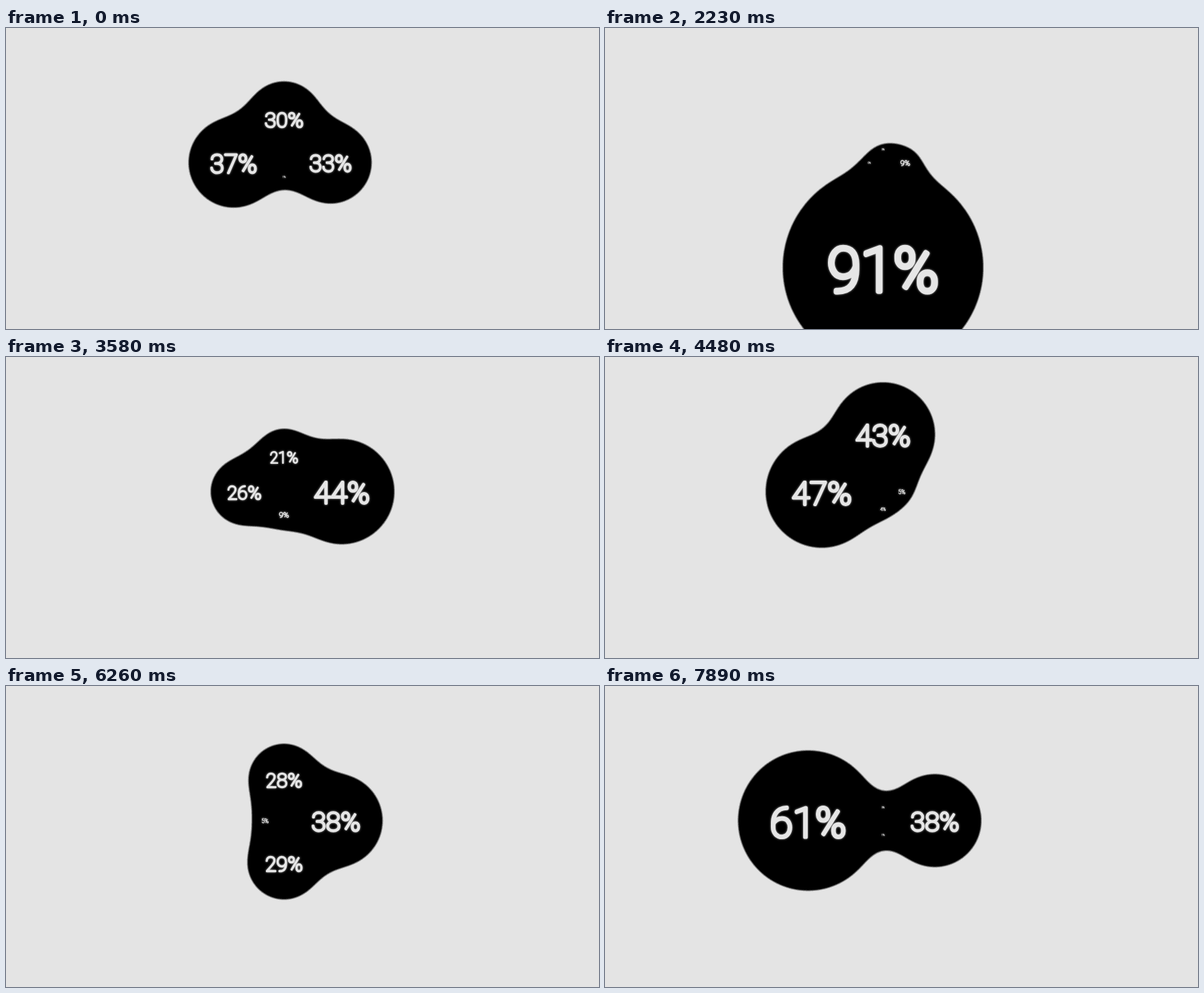
An HTML page that plays this animation: 883x448 px, repeating every 8 s.

```html
<!DOCTYPE html>
<html lang="en">
<head>
<meta charset="utf-8">
<title>Blob shares</title>
<style>
  html, body { margin: 0; width: 100%; height: 100%; overflow: hidden; background: #e4e4e4; }
  svg { display: block; width: 883px; height: 448px; }
  text {
    font-family: Roboto, sans-serif;
    font-weight: 100;
    text-anchor: middle;
    fill: #e6e6e6;
    stroke: #e6e6e6;
    stroke-width: 0.085em;
    stroke-linejoin: round;
    stroke-linecap: round;
  }
  #labels { filter: drop-shadow(0 0 1.6px rgba(228, 228, 228, 0.75)); }
</style>
</head>
<body>
<svg viewBox="0 0 883 448">
  <filter id="goo" filterUnits="userSpaceOnUse" x="-20" y="-80" width="923" height="720">
    <feGaussianBlur stdDeviation="20"/>
    <feColorMatrix values="1 0 0 0 0  0 1 0 0 0  0 0 1 0 0  0 0 0 20 -11.6"/>
  </filter>
  <g id="blobs" filter="url(#goo)"></g>
  <g id="labels"></g>
</svg>
<script>
const LOOP = 8000, STEP = 148.9, LEAD = 8;
const CX = 414, CY = 200.3;
const DIRS = [[-1, 0], [0, -1], [0, 1], [1, 0]];

// Key poses: step, then percent left, top and bottom; right takes the rest
const POSES = [
  [0, 36.7, 29.8, 0.6],
  [4, 31, 24, 2],
  [7, 23, 15, 29],
  [13, 0, 0, 97],
  [15, 0.3, 0.3, 90.7],
  [24, 26, 21, 9],
  [31, 48.3, 44.4, 3.6],
  [37, 20.7, 29.7, 28.9],
  [41, 7, 28, 27.3],
  [47, 0.6, 26, 46],
  [51, 73.5, 0.4, 0.7],
  [53, 61, 0.3, 0.6]
];

function slope(i, c) {
  const a = POSES[i], b = POSES[i + 1];
  return a && b ? (b[c] - a[c]) / (b[0] - a[0]) : 0;
}

// Monotone tangent: flat at peaks, so the curve never overshoots a pose
function tangent(i, c) {
  const p = slope(i - 1, c), q = slope(i, c);
  return p * q > 0 ? 2 * p * q / (p + q) : 0;
}

function share(step, c) {
  let i = 0;
  while (i < POSES.length - 2 && step >= POSES[i + 1][0]) i++;
  const a = POSES[i], b = POSES[i + 1], h = b[0] - a[0];
  const u = (step - a[0]) / h, v = 1 - u;
  return a[c] * (1 + 2 * u) * v * v + b[c] * u * u * (3 - 2 * u)
    + h * u * v * (v * tangent(i, c) - u * tangent(i + 1, c));
}

function add(parent, tag) {
  const el = document.createElementNS("http://www.w3.org/2000/svg", tag);
  return document.getElementById(parent).appendChild(el);
}

const parts = DIRS.map(() => ({ blob: add("blobs", "circle"), label: add("labels", "text") }));

function draw(time) {
  const step = Math.floor((time % LOOP + LEAD) / STEP);
  const shares = [1, 2, 3].map(c => share(step, c));
  shares.push(Math.max(0, 100 - shares[0] - shares[1] - shares[2]));
  parts.forEach(({ blob, label }, i) => {
    const p = shares[i];
    // Every circle touches the centre, so its radius is also its distance
    const r = 20 + 1.5 * p, size = 3 + 0.96 * p;
    const x = CX + DIRS[i][0] * r, y = CY + DIRS[i][1] * r;
    blob.setAttribute("cx", x);
    blob.setAttribute("cy", y);
    blob.setAttribute("r", r);
    label.setAttribute("x", x);
    label.setAttribute("y", y + 0.5 + 0.39 * size);
    label.style.fontSize = size + "px";
    label.textContent = Math.round(p) + "%";
  });
}

const start = performance.now();
function tick() {
  draw(performance.now() - start);
  requestAnimationFrame(tick);
}
tick();
</script>
</body>
</html>
```
